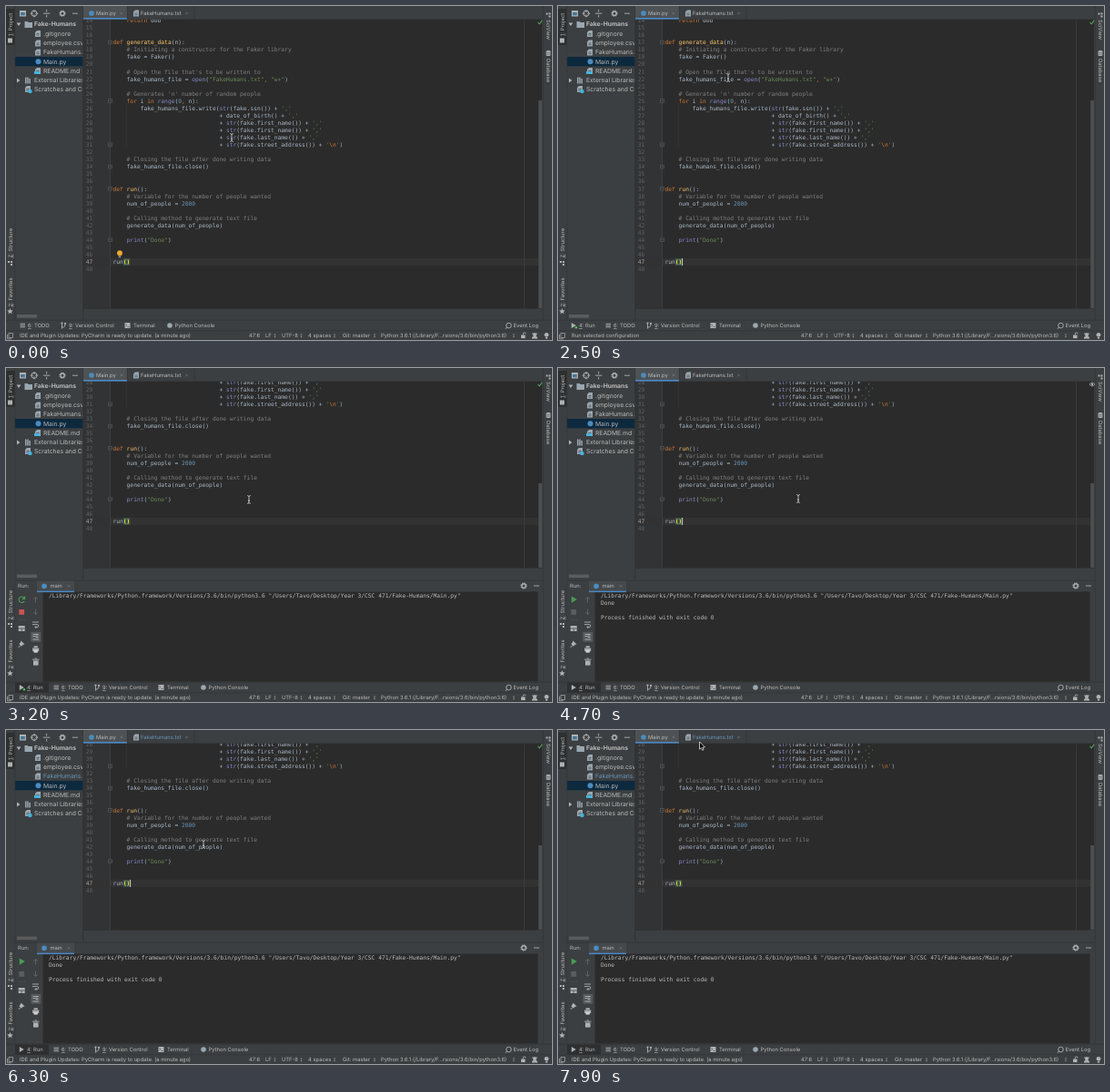
An HTML page that plays this animation: 600 by 368 pixels, repeating every 8 s.

```html
<!DOCTYPE html>
<html lang="en">
<head>
<meta charset="utf-8">
<title>Editor run</title>
<style>
html, body { margin: 0; width: 100%; height: 100%; overflow: hidden; background: #3c3f41; }
#stage { display: block; width: 600px; height: 368px; }
text { font-family: Inter, Roboto, sans-serif; white-space: pre; text-rendering: geometricPrecision; }
.mono { font-family: "DejaVu Sans Mono", "Liberation Mono", monospace; }
tspan.u { text-decoration: underline; }
</style>
</head>
<body>
<svg id="stage" viewBox="0 0 600 368"></svg>
<script>
const LOOP = 8000, STEP = 100;
const CODE = `    return dob


def generate_data(n):
    # Initiating a constructor for the Faker library
    fake = Faker()

    # Open the file that's to be written to
    fake_humans_file = open("FakeHumans.txt", "w+")

    # Generates 'n' number of random people
    for i in range(0, n):
        fake_humans_file.write(str(fake.ssn()) + ','
                               + date_of_birth() + ','
                               + str(fake.first_name()) + ','
                               + str(fake.first_name()) + ','
                               + str(fake.last_name()) + ','
                               + str(fake.street_address()) + '\\n')

    # Closing the file after done writing data
    fake_humans_file.close()


def run():
    # Variable for the number of people wanted
    num_of_people = 2000

    # Calling method to generate text file
    generate_data(num_of_people)

    print("Done")


run()
`.split("\n");
const FIRST = 14, CODE_X = 117.5, CHAR = 3.775, MONO = 6.27, SCROLL = -113;
const BAR = 5.85, TREE = 6.75;
const PANEL = "#3c3f41", EDITOR = "#2b2b2b", INK = "#bbbbbb", ICON = "#afb1b3", BLUE = "#6897bb", GREEN = "#499c54";

const rect = (x, y, w, h, fill, extra = "") =>
  `<rect x="${x}" y="${y}" width="${w}" height="${h}" fill="${fill}" ${extra}/>`;
const line = (d, color = ICON, width = 0.9) =>
  `<path d="${d}" fill="none" stroke="${color}" stroke-width="${width}"/>`;
const shape = (d, fill = ICON) => `<path d="${d}" fill="${fill}"/>`;
const dot = (x, y, r, fill) => `<circle cx="${x}" cy="${y}" r="${r}" fill="${fill}"/>`;
const group = (id, body) => `<g id="${id}">${body}</g>`;
// y is the middle of the row
const text = (x, y, s, size = BAR, fill = INK, extra = "") =>
  `<text x="${x}" y="${y + size * 0.36}" font-size="${size}" fill="${fill}" ${extra}>${s}</text>`;
const mono = (x, y, s, fill = "#a9b7c6", extra = "") => text(x, y, s, MONO, fill, `class="mono" ${extra}`);
const upright = (x, y, angle, s) =>
  `<g transform="translate(${x} ${y}) rotate(${angle})">${text(0, 0, s)}</g>`;
const key = (k, s) => `<tspan class="u">${k}</tspan>: ${s}`;
const rowY = n => 40 + (n - 17) * 8.065;

function highlight(src) {
  const rule = /(#.*)|('(?:\\.|[^'])*'|"[^"]*")|\b(def|return|for|in)\b|\b(\d+)\b|\b(open|range|print|str)\b|(,)|(\w+(?=\(n?\):))/g;
  const colors = ["#808080", "#6a8759", "#cc7832", BLUE, "#8888c6", "#cc7832", "#ffc66d"];
  const paint = (s, c) => `<tspan fill="${c}">${s}</tspan>`;
  return src.replace(rule, (s, ...hits) => {
    const kind = hits.slice(0, 7).findIndex(h => h !== undefined);
    return paint(s.replace("\\n", m => paint(m, "#cc7832")), colors[kind]);
  });
}

const page = (x, y, color = "#9aa7b0") =>
  shape(`M${x - 1} ${y - 3.5}h4v7h-6v-5z`, color) + line(`M${x - 1.6} ${y}h3.2m-3.2 1.7h3.2`, PANEL, 0.6);
const gear = (x, y) =>
  `<circle cx="${x}" cy="${y}" r="2.2" fill="none" stroke="${ICON}" stroke-width="1.4"/>` +
  `<circle cx="${x}" cy="${y}" r="3.2" fill="none" stroke="${ICON}" stroke-width="1" stroke-dasharray="1.2 1.31"/>`;
const cross = (x, y) => line(`M${x - 1.3} ${y - 1.3}l2.6 2.6m0 -2.6l-2.6 2.6`, "#7a7d80", 0.6);
const updown = (x, y) => shape(`M${x - 1.1} ${y - 0.6}l1.1 -1.7l1.1 1.7zm0 1.2l1.1 1.7l1.1 -1.7z`, "#999");

function editor() {
  const folds = [17, 25, 31, 34, 37, 44];
  const caretRow = rowY(47);
  let s = rect(85, -20, 29.5, 500, "#313335") + rect(85, caretRow - 4, 504, 8.1, "#323232") +
    line("M114.5 -20V480", "#494b4d", 0.6) + line("M569.5 -20V480", PANEL, 0.8) +
    line(`M132.6 ${rowY(25.5)}V${rowY(31.5)}`, "#373737", 0.6);
  CODE.forEach((src, i) => {
    const n = FIRST + i, y = rowY(n);
    s += mono(95.2, y, n, n === 47 ? "#a4a3a3" : "#606366", 'text-anchor="end"');
    if (src && n !== 47) s += mono(CODE_X, y, highlight(src));
  });
  for (const n of folds)
    s += rect(112.7, rowY(n) - 1.9, 3.7, 3.8, EDITOR, 'stroke="#606366" stroke-width=".6"') +
      line(`M113.5 ${rowY(n)}h2.1`, "#808386", 0.6);
  s += rect(CODE_X + 3 * CHAR, caretRow - 4, 2 * CHAR, 8, "#3b514d") + mono(CODE_X, caretRow, "run") +
    mono(CODE_X + 3 * CHAR, caretRow, "()", "#ffef28", 'font-weight="bold"');
  s += group("caret", rect(136.1, caretRow - 4, 1, 8, "#d0d0d0"));
  s += group("bulb", dot(125, 272.2, 2.9, "#f0a732") + rect(123.8, 275.4, 2.4, 1.8, "#9a9da0"));
  return `<svg id="view" x="85" y="14.5" width="504" height="319">` +
    rect(0, 0, 504, 500, EDITOR) + `<g id="code">${s}</g></svg>`;
}

function tree() {
  const row = (x, y, s, fill = INK, extra) => text(x, y, s, TREE, fill, extra);
  const down = (x, y) => shape(`M${x - 2.4} ${y - 1.5}h4.8l-2.4 3.4z`);
  const right = (x, y) => shape(`M${x - 1.5} ${y - 2.4}v4.8l3.4 -2.4z`);
  const body =
    down(14, 20) + shape("M20.5 17h3l1 1h4.5v6h-8.5z", "#9aa7b0") + row(31, 20, "Fake-Humans", INK, 'font-weight="700"') +
    page(35, 30.5) + row(41, 30.5, ".gitignore") +
    page(35, 41) + row(41, 41, "employee.csv") +
    page(35, 51) + row(41, 51, "FakeHumans.txt", INK, 'class="fresh"') +
    dot(35.5, 61.2, 3, "#4b8bbe") + row(41, 61.2, "Main.py") +
    page(35, 71.5) + rect(31, 72, 6, 3, "#40b6e0") + row(41, 71.5, "README.md") +
    right(13.5, 82) + shape("M21 78.5h1.5v7h-1.5zm2.2 0h1.5v7h-1.5zm2.2 1.5h1.5v5.5h-1.5z", "#9aa7b0") +
    row(31, 82, "External Libraries") +
    page(24, 91.5) + dot(26.5, 94, 2.2, "#40b6e0") + row(31, 92, "Scratches and Consoles") +
    group("treeBar", rect(12, 340, 22, 3.6, "#595b5d"));
  return `<svg x="10" y="0" width="74.5" height="346">` + rect(0, 0, 75, 346, PANEL) + rect(0, 56, 75, 10.4, "#0d293e") +
    `<g transform="translate(-10)">${body}</g></svg>` + line("M84.7 0V346", "#2f3133", 0.8);
}

function header() {
  return rect(10, 0, 74.5, 14.5, PANEL) +
    rect(15, 5, 7, 6.5, ICON) + rect(16.2, 7, 4.6, 3.3, "#40759a") +
    `<circle cx="31" cy="8.2" r="3.1" fill="none" stroke="${ICON}"/>` + line("M31 4v3m0 2.4v3m-4.2 -4.2h3m2.4 0h3") +
    line("M41 8.2h7.2m-3.6 -4.4v2.8m0 3.2v2.8") + gear(62, 8.2) + line("M73 8.2h6") +
    rect(85, 0, 505, 14.5, PANEL) + rect(85, 0, 48, 14.5, "#4e5254") + rect(85, 13, 48, 1.6, "#4a88c7") +
    dot(94, 8, 2.8, "#4b8bbe") + text(99, 8, "Main.py") + cross(127, 8) +
    page(143, 8) + text(148, 8, "FakeHumans.txt", BAR, INK, 'class="fresh"') + cross(198.5, 8) +
    line("M133.3 0V14.5M207 0V14.5M133 14.6H590", "#323436", 0.6);
}

function sides() {
  const blocks = (x, y) => shape(`M${x - 2.5} ${y - 2.5}h2v2h-2zm3 0h2v2h-2zm0 3h2v2h-2z`);
  return rect(0, 0, 10, 346, PANEL) + rect(0, 3, 9.6, 40, "#2d2f31") +
    upright(4.5, 33, -90, key(1, "Project")) + rect(2, 35.5, 5, 5, ICON) +
    upright(4.5, 277.5, -90, key("Z", "Structure")) + blocks(4.5, 283.5) +
    upright(4.5, 331.5, -90, key(2, "Favorites")) +
    shape("M4.5 333l1 2.2 2.3 .2 -1.8 1.6 .6 2.3 -2.1 -1.2 -2.1 1.2 .6 -2.3 -1.8 -1.6 2.3 -.2z") +
    line("M9.8 0V346", "#323436", 0.6) +
    rect(590, 0, 10, 346, PANEL) + line("M590.3 0V346", "#323436", 0.6) +
    blocks(596, 10) + upright(596, 15, 90, "SciView") +
    rect(593.5, 49, 5, 6, ICON, 'rx="1.5"') + line("M593.5 51.3h5m-5 1.8h5", PANEL, 0.5) + upright(596, 58, 90, "Database");
}

function runPanel() {
  const path = '/Library/Frameworks/Python.framework/Versions/3.6/bin/python3.6 "/Users/Tavo/Desktop/Year 3/CSC 471/Fake-Humans/Main.py"';
  return rect(10, 234, 580, 112, PANEL) + line("M10 234.2H590", "#323436", 0.7) +
    rect(40.5, 246.5, 544, 99, EDITOR) +
    text(13, 240.3, "Run:") + rect(34, 234.6, 41, 12, "#45494b") + rect(34, 245.6, 41, 1.5, "#4a88c7") +
    dot(42, 240.3, 2.9, "#4b8bbe") + text(48.5, 240.3, "main") + cross(69, 240.3) +
    gear(569, 240) + line("M580 240h6") +
    line("M32.5 258.5v-6m-2.3 2.3l2.3 -2.3l2.3 2.3M32.5 265.5v6m-2.3 -2.3l2.3 2.3l2.3 -2.3", "#626567") +
    group("busy", line("M20 253.4a3.2 3.2 0 1 0 .2 3.4", GREEN, 1.1) + shape("M21.2 251v4h-4z", GREEN) + rect(14.3, 266, 5.8, 5.8, "#c75450")) +
    group("idle", shape("M14.8 251.5v7.2l6 -3.6z", GREEN) + rect(14.3, 266, 5.8, 5.8, "#5a5d5f")) +
    line("M13.5 277.4h8", "#515456", 0.6) +
    rect(13.7, 284, 7, 6, ICON) + line("M13.7 287h7m-3.5 0v3", PANEL, 0.7) +
    shape("M16.5 300.5l4 4 -2 .6 -1.6 1.6 -2.6 -2.6 1.6 -1.6z") + line("M16 305.5l-2.3 2.5") +
    line("M29 280h7m-7 2.6h5.3a1.5 1.5 0 0 1 0 3h-2.3m1.3 -1.4l-1.4 1.4l1.4 1.4") +
    rect(27.3, 290.8, 11, 11, "#55595c", 'rx="1"') + line("M29.5 293.5h6.5m-6.5 2h3m-3 3.6h6.5m-2 -6v4.2m-1.5 -1.5l1.5 1.5l1.5 -1.5") +
    rect(29.2, 308.5, 7, 3.6, ICON) + rect(30.6, 306.3, 4.2, 1.7, ICON) + rect(30.6, 311, 4.2, 2.6, "#d0d2d4") +
    rect(30, 322.4, 5.6, 5.2, ICON) + line("M29 321.2h7.6m-5 -1.2h2.4") +
    group("command", mono(47, 250.8, path, INK)) +
    group("output", mono(47, 258.9, "Done", INK) + mono(47, 275, "Process finished with exit code 0", INK));
}

function footer() {
  const tools =
    line("M15.5 350.2h5.5m-5.5 1.8h5.5m-5.5 1.8h5.5") + text(24, 352, key(6, "TODO")) +
    line("M61.5 349v6.5m0 -1.5c3 0 3.5 -1 3.5 -4") + dot(61.5, 349.5, 1.1, ICON) + dot(65, 349.8, 1.1, ICON) +
    text(69, 352, key(9, "Version Control")) +
    rect(130.5, 349, 6, 6, ICON) + line("M131.5 350.5l1.3 1.2l-1.3 1.2m2 .6h2", PANEL, 0.6) + text(140, 352, "Terminal") +
    dot(180, 352, 2.8, "#9aa7b0") + text(185.5, 352, "Python Console");
  const fields = [[267, "47:6"], [285, "LF", 295.5], [303, "UTF-8", 324.5], [332, "4 spaces", 361],
    [370, "Git: master", 405], [412, "Python 3.6.1 (/Library/F…rsions/3.6/bin/python3.6)", 558]];
  return rect(0, 346, 600, 22, PANEL) + line("M0 346.2H600M0 357.8H600", "#323436", 0.7) +
    group("runTool", group("runPressed", rect(10, 346.6, 37, 11, "#2d2f31")) +
      shape("M14.8 349v6l5 -3z", ICON) + text(23, 352, key(4, "Run"))) +
    group("runLive", dot(20, 354.2, 1.3, "#4fc35a")) +
    group("tools", tools) +
    `<circle cx="552.5" cy="352" r="2.8" fill="none" stroke="${ICON}" stroke-width=".9"/>` + line("M550.5 354l-1.5 1.8") +
    text(557.5, 352, "Event Log") +
    line("M3 360.5h4.5v5h-4.5zm-1.5 1.3v5h4.5", ICON, 0.7) +
    group("notice", text(15, 363.2, "IDE and Plugin Updates: PyCharm is ready to update. (a minute ago)")) +
    group("hint", text(15, 363.2, "Run selected configuration")) +
    fields.map(([x, s, mark]) => text(x, 363.2, s) + (mark ? updown(mark, 363.2) : "")).join("") +
    rect(566, 362.5, 4.6, 3.6, ICON) + line("M568.2 362.5v-1.2a1.4 1.4 0 0 1 2.8 0") +
    dot(581, 362.2, 2, ICON) + shape("M577.8 366.4a3.2 2.6 0 0 1 6.4 0z") + line("M578 361h6", ICON, 0.8) +
    dot(594, 362.3, 2.4, ICON) + rect(592.8, 365, 2.4, 1.5, ICON);
}

const IBEAM = "M-1.8 -4.4Q0 -4.4 0 -3.2Q0 -4.4 1.8 -4.4M0 -3.2V3.2M-1.8 4.4Q0 4.4 0 3.2Q0 4.4 1.8 4.4M-1 1.2H1";
const stage = document.getElementById("stage");
stage.innerHTML = rect(0, 0, 600, 368, PANEL) + editor() +
  rect(585.3, 0, 3.6, 1, "#4d4f50", 'id="thumb"') +
  group("check", line("M584.5 17.8l1.8 2l3 -4.2", GREEN, 1.2)) +
  group("eye", line("M584 18q3 -4 6 0q-3 4 -6 0z", ICON, 0.8) + dot(587, 18, 1.2, ICON)) +
  tree() + header() + sides() + group("panel", runPanel()) + footer() +
  group("ibeam", line(IBEAM, "#1a1a1a", 1.7) + line(IBEAM, "#eeeeee", 0.8)) +
  group("arrow", `<path d="M0 0V8.2L1.9 6.5L3.2 9.3L4.6 8.7L3.4 6H6Z" fill="#000" stroke="#fff" stroke-width=".7"/>`);

const el = id => document.getElementById(id);
const show = (id, on) => el(id).setAttribute("visibility", on ? "inherit" : "hidden");
const move = (id, x, y) => el(id).setAttribute("transform", `translate(${x} ${y})`);
const fresh = document.querySelectorAll(".fresh");

// time, x, y of the pointer
const TRACK = [[0, 248, 145], [600, 246, 132], [1200, 215, -12], [1900, 190, -12], [2500, 187, 79],
  [3100, 267, 145], [4700, 264, 144], [5500, 262, 143], [6300, 217, 126], [7000, 196, 96], [7800, 155.5, 13], [8000, 155.5, 13]];

function pointer(t) {
  const i = TRACK.findIndex(k => k[0] > t);
  const [t0, x0, y0] = TRACK[i - 1], [t1, x1, y1] = TRACK[i];
  const u = (t - t0) / (t1 - t0), e = u * u * (3 - 2 * u);
  return [x0 + (x1 - x0) * e, y0 + (y1 - y0) * e];
}

function draw(t) {
  const started = t >= 2200, opened = t >= 2600, done = t >= 4100;
  const checking = t >= 4600 && t < 5200, hinted = t >= 1300 && t < 2600;
  show("caret", t % 1000 >= 250 && t % 1000 < 750);
  show("bulb", t < 2100);
  show("hint", hinted);
  show("notice", !hinted);
  show("check", !checking);
  show("eye", checking);
  show("panel", opened);
  show("command", opened && t >= 2800);
  show("output", done);
  show("busy", opened && !done);
  show("idle", done);
  show("runTool", started);
  show("runPressed", opened);
  show("runLive", started && !done);
  move("tools", started ? 37 : 0, 0);
  move("code", -85, -14.5 + (opened ? SCROLL : 0));
  move("treeBar", 0, opened ? SCROLL + 0.5 : 0);
  el("view").setAttribute("height", opened ? 206 : 319);
  el("thumb").setAttribute("y", opened ? 127 : 104);
  el("thumb").setAttribute("height", opened ? 93 : 229);
  fresh.forEach(n => n.setAttribute("fill", t >= 5500 ? BLUE : INK));

  const [x, y] = pointer(t), onTabs = y < 20;
  show("arrow", onTabs);
  show("ibeam", !onTabs);
  move(onTabs ? "arrow" : "ibeam", x, y);
}

const begin = performance.now();
function tick() {
  const t = (performance.now() - begin) % LOOP;
  draw(Math.floor(t / STEP) * STEP);
  requestAnimationFrame(tick);
}
tick();
</script>
</body>
</html>
```
